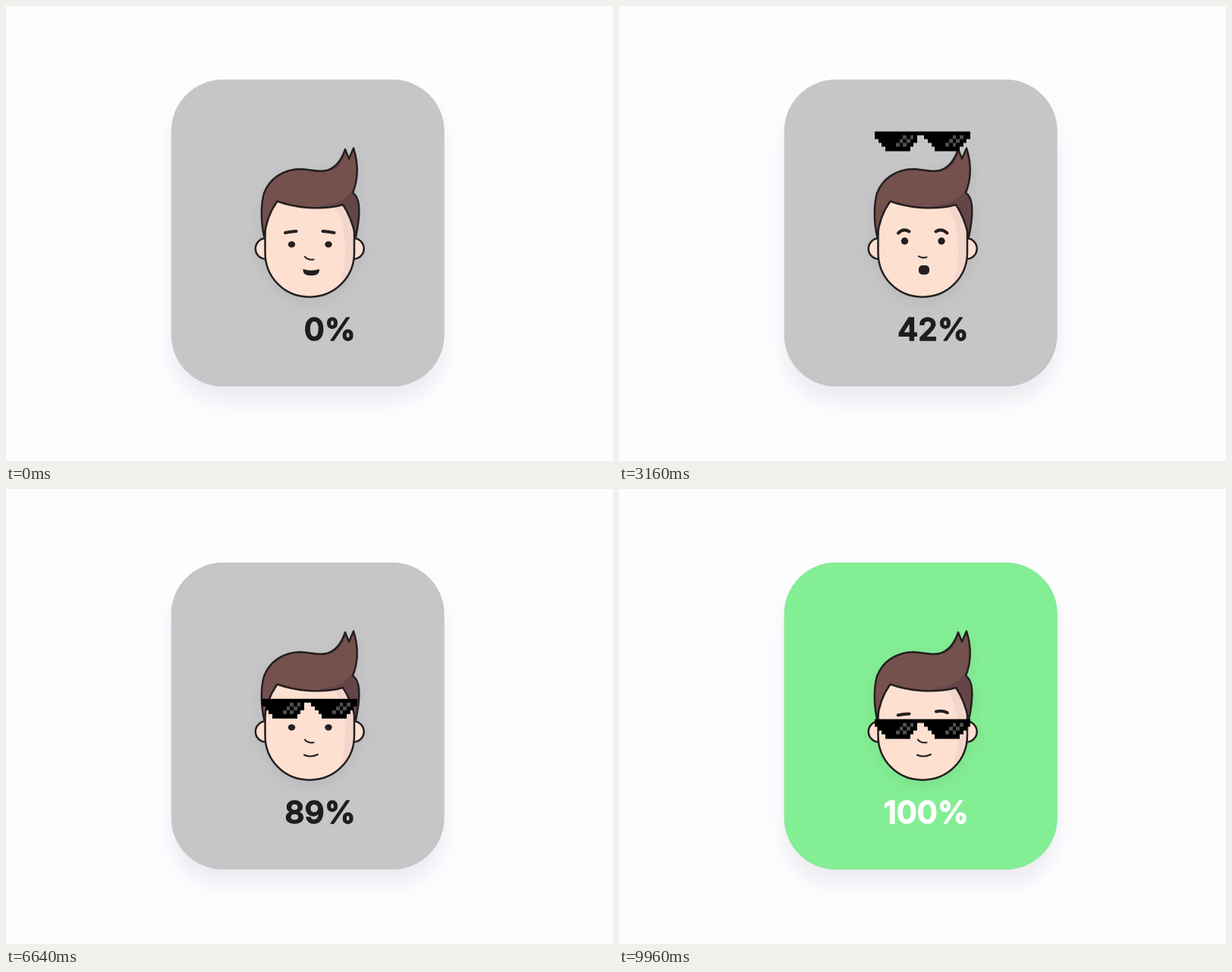
An HTML page that plays this animation: 800 px wide and 600 px high, repeating every 10000 ms.

```html
<!DOCTYPE html>
<html lang="en">
<head>
<meta charset="utf-8">
<title>Cool loader</title>
<style>
  html, body { margin: 0; width: 100%; height: 100%; overflow: hidden; background: #fdfcff; }
  svg { display: block; width: 800px; height: 600px; }

  .card { fill: #c6c6c8; filter: drop-shadow(0 20px 11px rgba(20, 15, 30, .065)); }
  .head { filter: drop-shadow(0 6px 9px rgba(0, 0, 0, .06)); }
  .ink { stroke: #231f20; stroke-width: 2.5; stroke-linejoin: round; }
  .skin { fill: #fee0d1; }
  .hair { fill: #75514d; }
  .dot { fill: #231f20; }
  .line { fill: none; stroke: #231f20; stroke-width: 2.1; stroke-linecap: round; }
  .brow { stroke-width: 4; }
  .label { font: 600 41px Inter, sans-serif; text-anchor: end; paint-order: stroke;
    stroke-width: 1.3; stroke-linejoin: round; }

  .label, .burst, .pop, .glasses, .mood, .lift { animation: 10s linear infinite; }
  .burst { fill: #84ee94; transform-origin: 400.5px 314.5px; animation-name: burst; }
  .pop { transform-origin: 400px 316px; animation-name: pop; animation-timing-function: ease-in-out; }
  .glasses { animation-name: drop; }
  .label { animation-name: tint; animation-timing-function: step-end; }
  .mood { animation-timing-function: step-end; }
  .happy { animation-name: happy; }
  .amazed { animation-name: amazed; }
  .smug { animation-name: smug; }
  .lift { animation-name: lift; }

  @keyframes drop {
    0% { transform: translate(337px, 64.5px); }
    74.8%, 100% { transform: translate(337px, 303.5px); }
  }
  @keyframes burst {
    0%, 74.8% { transform: scale(0); opacity: 0; }
    77.2% { transform: scale(.72); opacity: 1; }
    78.2%, 100% { transform: scale(1); opacity: 1; }
  }
  @keyframes pop {
    0%, 74.8% { transform: scale(1); }
    77.2% { transform: scale(1.114); }
    81.5%, 100% { transform: scale(1); }
  }
  @keyframes tint {
    0% { fill: #1d1d1f; stroke: #1d1d1f; }
    74.8%, 100% { fill: #fff; stroke: #fff; }
  }
  @keyframes happy { 0% { opacity: 1; } 24.7%, 100% { opacity: 0; } }
  @keyframes amazed { 0% { opacity: 0; } 24.7% { opacity: 1; } 49.4%, 100% { opacity: 0; } }
  @keyframes smug { 0% { opacity: 0; } 49.4%, 100% { opacity: 1; } }
  @keyframes lift {
    0%, 62% { transform: translateY(0); }
    66%, 100% { transform: translateY(-3px); }
  }
</style>
</head>
<body>
<svg viewBox="0 0 800 600">
  <defs>
    <clipPath id="inCard"><rect x="217.7" y="97" width="360" height="404.7" rx="68"/></clipPath>
    <path id="hairShape" d="M340.5 305 C336 288 335.5 262 340 247 C347 228 365 215 389 215
      C402 215.5 412 220 424 216.5 C437 212 443 201 447 189 L452 201.5 L458 187.5
      C464.5 208 464 229 457 246.5 C468 253 467 276 461 304.5
      C457 287 451 272 444 262 C416 270 381 266 357.5 257.5 C347 272 342 287 340.5 305 Z"/>
    <path id="faceShape" d="M341.5 250 V325 C341.5 358 367 383.7 400 383.7 S459 358 459 325 V250 Z"/>
    <clipPath id="inHair"><use href="#hairShape"/></clipPath>
    <clipPath id="inFace"><use href="#faceShape"/></clipPath>
  </defs>

  <rect class="card" x="217.7" y="97" width="360" height="404.7" rx="68"/>

  <g clip-path="url(#inCard)">
    <circle class="burst" cx="400.5" cy="314.5" r="300"/>
    <g class="pop">
      <g class="head">
        <circle class="ink skin" cx="342.5" cy="320" r="13.7"/>
        <circle class="ink skin" cx="458" cy="320" r="13.7"/>
        <use class="skin" href="#faceShape"/>
        <path fill="#f3d6cb" clip-path="url(#inFace)"
          d="M428 260 C443 275 447 300 447 321 C447 345 442 360 436 376 L464 376 V255 Z"/>
        <use class="ink" fill="none" href="#faceShape" clip-path="none"/>
        <use class="hair" href="#hairShape"/>
        <g clip-path="url(#inHair)" fill="#654548">
          <path d="M447 187 C447 203 440 215 424 218 L420 214 Z"/>
          <path d="M465 215 C461 245 447 260 420 262 L400 270 H445 L462 310 L472 250 Z"/>
        </g>
        <use class="ink" fill="none" href="#hairShape"/>
      </g>

      <g class="mood happy">
        <path class="line brow" d="M368 299 Q375 297.3 382.5 297 M417.5 297 Q425 297.3 432.5 299"/>
        <ellipse class="dot" cx="376.5" cy="314.3" rx="4.7" ry="4.1"/>
        <ellipse class="dot" cx="425" cy="314.3" rx="4.7" ry="4.1"/>
        <path class="line" d="M394 330.5 Q397 335.3 405.5 334.3"/>
        <path class="dot" d="M391.5 347 Q402 350.5 413 347 Q413.5 355.5 402 355.5 Q391 355.5 391.5 347 Z"/>
      </g>
      <g class="mood amazed">
        <path class="line brow" d="M368 299.5 Q375 292.5 382.5 297.5 M417.5 297.5 Q425 292.5 432.5 299.5"/>
        <circle class="dot" cx="376.5" cy="310" r="4.7"/>
        <circle class="dot" cx="425" cy="310" r="4.7"/>
        <path class="line" d="M394.8 330 Q399 333 405.5 331.3"/>
        <rect class="dot" x="395" y="342" width="14" height="12.2" rx="5"/>
      </g>
      <g class="mood smug">
        <path class="line brow lift" d="M367.8 301.3 Q375 299.5 382.5 299.5 M418 296.5 Q426 294.5 432.8 298"/>
        <ellipse class="dot" cx="376.5" cy="314.3" rx="4.7" ry="4.1"/>
        <ellipse class="dot" cx="425" cy="314.3" rx="4.7" ry="4.1"/>
        <path class="line" d="M394 330.5 Q397 335.3 405.5 334.3"/>
        <path class="line" d="M393 350.7 Q402 354.7 411 350"/>
      </g>

      <g class="glasses" id="glasses" shape-rendering="crispEdges"></g>
    </g>
  </g>

  <text class="label" id="label" x="461" y="440.5">0%</text>
</svg>
<script>
  const LOOP = 10000, FILL = 7480;
  const CELL_W = 126 / 27, CELL_H = 5.1;
  const glasses = document.getElementById('glasses');
  const label = document.getElementById('label');

  function cells(row, from, to, color) {
    const rect = document.createElementNS('http://www.w3.org/2000/svg', 'rect');
    const box = { x: from * CELL_W, y: row * CELL_H, width: (to - from + 1) * CELL_W, height: CELL_H, fill: color };
    for (const key in box) rect.setAttribute(key, box[key]);
    glasses.append(rect);
  }

  // Each lens narrows by one cell per row; glints run down diagonally.
  cells(0, 0, 26, '#000');
  const left = [[0, 11], [1, 11], [2, 10], [3, 9]];
  left.forEach(([from, to], i) => {
    cells(i + 1, from, to, '#000');
    cells(i + 1, 14 + i, 26 - i, '#000');
  });
  for (let row = 1; row <= 3; row++) {
    for (const col of [9, 11, 23, 25]) cells(row, col - row, col - row, '#505050');
  }

  let start;
  function frame(now) {
    start ??= now;
    const t = (now - start) % LOOP;
    const text = Math.min(100, Math.round(t / FILL * 100)) + '%';
    if (label.textContent !== text) label.textContent = text;
    requestAnimationFrame(frame);
  }
  requestAnimationFrame(frame);
</script>
</body>
</html>
```
